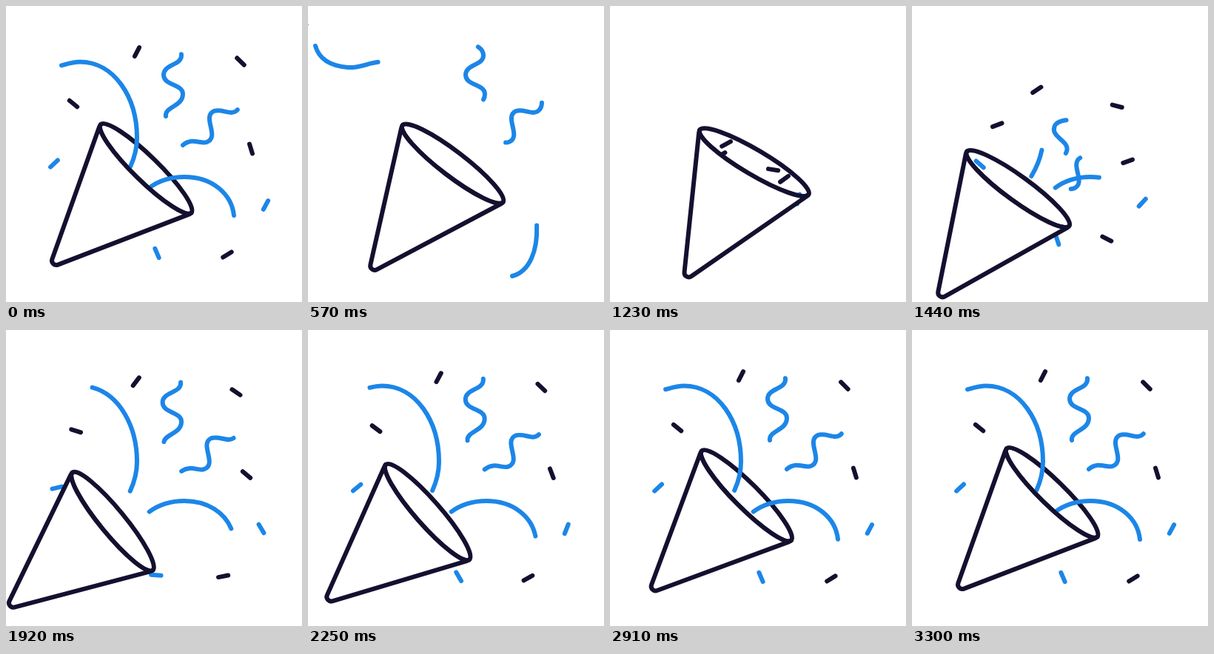
Write an HTML page with a canvas that moves like this. It is 400 px wide and 400 px high and loops after 3330 ms.

```html
<!DOCTYPE html>
<html lang="en">
<head>
<meta charset="utf-8">
<title>Party popper</title>
<style>
  html, body { margin: 0; width: 100%; height: 100%; overflow: hidden; background: #fff; }
  canvas { display: block; width: 400px; height: 400px; }
</style>
</head>
<body>
<canvas id="stage" width="400" height="400"></canvas>
<script>
const ctx = document.getElementById('stage').getContext('2d');
const LOOP = 3330, FIRE = 1230;
const DARK = '#14102f', BLUE = '#1c86e8';
const HUB = { x: 190, y: 235 };
const RAD = Math.PI / 180;

const lerp = (a, b, p) => a + (b - a) * p;
const clamp01 = v => Math.min(1, Math.max(0, v));
const sineInOut = p => (1 - Math.cos(Math.PI * clamp01(p))) / 2;
const settle = (age, pace, power) => 1 - Math.exp(-((age / pace) ** power));

// Monotone Hermite curve through [time, value] keys, at rest at both ends.
function spline(keys, t) {
  const last = keys.length - 1;
  if (t >= keys[last][0]) return keys[last][1];
  const slope = i => (keys[i + 1][1] - keys[i][1]) / (keys[i + 1][0] - keys[i][0]);
  const tangent = i => {
    if (i === 0 || i === last) return 0;
    const a = slope(i - 1), b = slope(i);
    return a * b <= 0 ? 0 : 2 * a * b / (a + b);
  };
  let i = 0;
  while (t > keys[i + 1][0]) i++;
  const span = keys[i + 1][0] - keys[i][0], u = (t - keys[i][0]) / span, v = 1 - u;
  return keys[i][1] * (1 + 2 * u) * v * v + keys[i + 1][1] * u * u * (3 - 2 * u)
    + span * u * v * (tangent(i) * v - tangent(i + 1) * u);
}

// Cone: wind up, kick back, settle.
const poses = [
  { t: 0, x: 190, y: 219, tilt: 44.3 },
  { t: 1165, x: 203, y: 205, tilt: 30.1 },
  { t: 1440, x: 144, y: 246, tilt: 36 },
  { t: 1640, x: 134, y: 256, tilt: 44.5 },
  { t: 1900, x: 144, y: 258, tilt: 50.6 },
  { t: 2580, x: 177, y: 230, tilt: 46.3 },
  { t: 3300, x: 190, y: 219, tilt: 44.3 }
];
const [xKeys, yKeys, tiltKeys] = ['x', 'y', 'tilt'].map(k => poses.map(p => [p.t, p[k]]));
const MOUTH = 85.5, DEPTH = 16.8, SAG = 1.2;

function withCone(t, draw) {
  ctx.save();
  ctx.translate(spline(xKeys, t), spline(yKeys, t));
  ctx.rotate(spline(tiltKeys, t) * RAD);
  ctx.strokeStyle = DARK;
  ctx.beginPath();
  draw();
  ctx.fill();
  ctx.stroke();
  ctx.restore();
}

const mouth = () => ctx.ellipse(0, SAG, MOUTH, DEPTH, 0, 0, 2 * Math.PI);

function body() {
  ctx.ellipse(0, SAG, MOUTH, DEPTH, 0, 0, Math.PI);
  ctx.lineTo(1 - MOUTH, 5);
  ctx.arcTo(0, 189, MOUTH - 1, 5, 6);
  ctx.lineTo(MOUTH - 1, 5);
  ctx.closePath();
}

// Ways to leave: progress of [tail, head] towards the end of the path.
const sweep = t => [sineInOut(t / 950), sineInOut(t / 570)];
const linger = t => Array(2).fill(clamp01(t / 1110) ** 2.7);

// A ribbon shows the stretch of its path between tail and head. Fresh from the
// cone it is off by drift, spin (degrees) and lag (tail length), all fading out.
function ribbon({ d, tail, head, ...motion }) {
  const el = document.createElementNS('http://www.w3.org/2000/svg', 'path');
  el.setAttribute('d', d);
  const total = el.getTotalLength();
  const lengthAt = ([x, y]) => {
    let best = 0, bestDist = Infinity;
    for (let s = 0; s <= total; s += 0.5) {
      const p = el.getPointAtLength(s), dist = Math.hypot(p.x - x, p.y - y);
      if (dist < bestDist) [best, bestDist] = [s, dist];
    }
    return best;
  };
  return {
    drift: [0, 0], spin: 0, lag: 0, power: 1, ...motion,
    path: new Path2D(d), total, tail: lengthAt(tail), head: lengthAt(head)
  };
}

const ribbons = [
  {
    d: 'M155 240C170 218 177 198 177 178C177 123 146 75.5 100 75.5C83 75.5 72 84 54 83C30 81 15 72 10 54',
    tail: [168, 217], head: [75, 80], leave: sweep, pace: 500, power: 1.66, lag: -15
  },
  {
    d: 'M186 252C203 236 222 231 241 231C280 231 305 255 308 283C313 322 303 358 276 365',
    tail: [193, 245], head: [308, 283], leave: sweep, pace: 320, power: 1.09
  },
  {
    d: 'M216 149C214 136 239 136 239 119C239 105 213 108 213 93C213 79 237 80 237 67C237 61 234 58 231 56C222 50 212 46 212 38C212 26 236 26 236 12',
    tail: [216, 149], head: [236, 66], leave: linger, pace: 117, lag: 37, drift: [-26, 74], spin: 18
  },
  {
    d: 'M239 188C252 177 263 187 271 184C290 177 264 150 281 142C292 138 304 149 312 141C316 137 316 134 316 130C316 112 352 124 352 100',
    tail: [239, 188], head: [313, 141], leave: linger, pace: 175, lag: 30, drift: [-53, 63]
  }
].map(ribbon);

function drawRibbon(r, t) {
  let { tail, head } = r, fresh = 0;
  if (t < FIRE) {
    const [tailOut, headOut] = r.leave(t);
    tail = lerp(tail, r.total, tailOut);
    head = lerp(head, r.total, headOut);
  } else {
    fresh = Math.exp((1440 - t) / 177);
    tail = Math.max(0, tail + r.lag * fresh);
    head *= settle(t - FIRE, r.pace, r.power);
  }
  if (head - tail < 0.5) return;
  const cx = 226, cy = 108;
  ctx.save();
  ctx.translate(cx + r.drift[0] * fresh, cy + r.drift[1] * fresh);
  ctx.rotate(r.spin * fresh * RAD);
  ctx.translate(-cx, -cy);
  ctx.strokeStyle = BLUE;
  ctx.setLineDash([head - tail, r.total + 50]);
  ctx.lineDashOffset = -tail;
  ctx.stroke(r.path);
  ctx.restore();
}

// Confetti: muzzle point, resting point, resting angle, turn made in flight.
const confetti = [
  { color: DARK, from: [157, 187], to: [177, 62], angle: -63, turn: -36 },
  { color: DARK, from: [220, 222], to: [317, 75], angle: 45, turn: 37 },
  { color: DARK, from: [235, 234], to: [331, 193], angle: 73, turn: 113 },
  { color: DARK, from: [212, 284], to: [299, 336], angle: -32, turn: -72 },
  { color: DARK, from: [150, 202], to: [91, 132], angle: 39, turn: 73 },
  { color: BLUE, from: [130, 215], to: [65, 213], angle: -43, turn: -103 },
  { color: BLUE, from: [254, 261], to: [351, 269], angle: 118, turn: 202 },
  { color: BLUE, from: [185, 290], to: [204, 334], angle: 67, turn: 214 }
];

function drawConfetti({ color, from, to, angle, turn }, t) {
  let [x, y] = to, turned = 1;
  if (t < FIRE) {
    const out = 2 * sineInOut(t / 1140);
    x += (x - HUB.x) * out;
    y += (y - HUB.y) * out;
    turned = 1 - clamp01(out);
  } else {
    const p = settle(t - FIRE, 238, 0.96);
    x = lerp(from[0], x, p);
    y = lerp(from[1], y, p);
    turned = sineInOut((t - 1066) / 1340);
  }
  const half = 6.7;
  ctx.save();
  ctx.translate(x, y);
  ctx.rotate((angle + turn * (turned - 1)) * RAD);
  ctx.strokeStyle = color;
  ctx.beginPath();
  ctx.moveTo(-half, 0);
  ctx.lineTo(half, 0);
  ctx.stroke();
  ctx.restore();
}

function frame(t) {
  ctx.fillStyle = '#fff';
  ctx.fillRect(0, 0, 400, 400);
  ctx.lineWidth = 6;
  ctx.lineCap = ctx.lineJoin = 'round';
  withCone(t, mouth);
  // Nothing is left on stage just before the shot.
  if (t < 1130 || t >= FIRE - 15) {
    confetti.forEach(c => drawConfetti(c, Math.max(t, t > 1130 ? FIRE : 0)));
    ribbons.forEach(r => drawRibbon(r, Math.max(t, t > 1130 ? FIRE : 0)));
  }
  withCone(t, body);
}

const begin = performance.now();
function tick() {
  frame((performance.now() - begin) % LOOP);
  requestAnimationFrame(tick);
}
tick();
</script>
</body>
</html>
```
